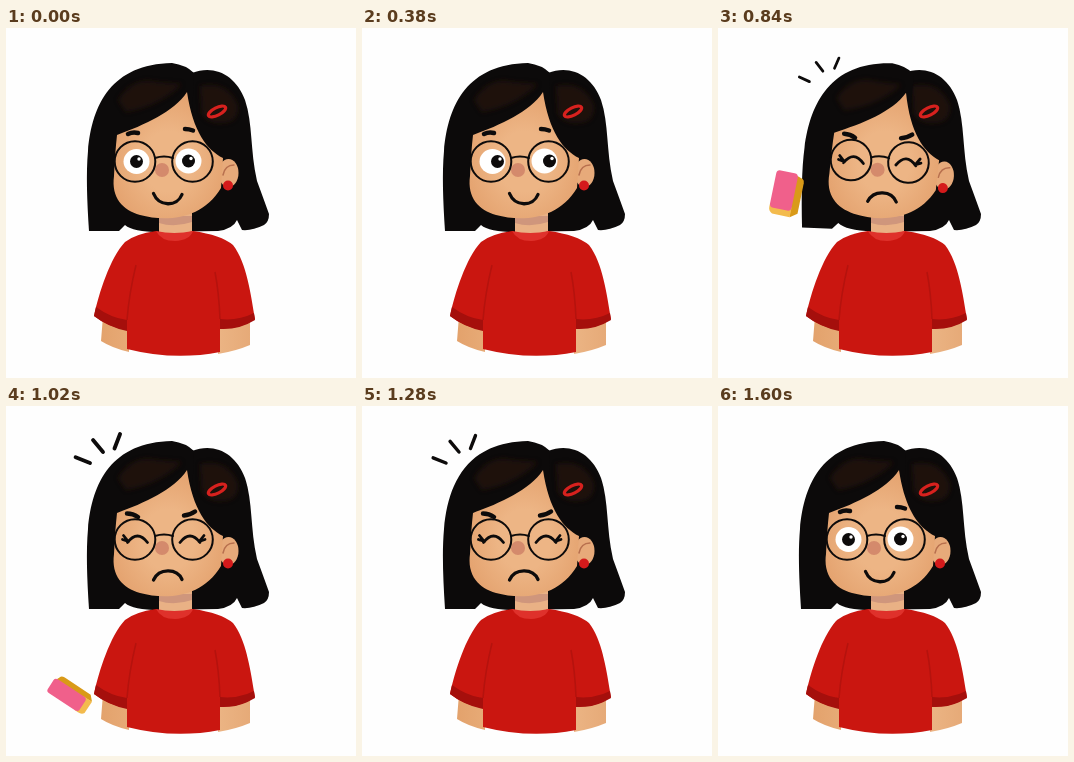
An HTML page that plays this animation: 350x350 px, repeating every 1840 ms.

```html
<!DOCTYPE html>
<html lang="en">
<head>
<meta charset="utf-8">
<title>Girl and eraser</title>
<style>
html, body { margin: 0; width: 100%; height: 100%; overflow: hidden; background: #fefefe; }
svg { display: block; width: 100vw; height: 100vh; }
.line { fill: none; stroke: #0d0b0b; stroke-linecap: round; stroke-linejoin: round; }
.hair { fill: #0c0a0a; }
.sheen { fill: #2a1610; opacity: .6; filter: url(#soft); }
</style>
</head>
<body>
<svg viewBox="0 0 350 350">
  <defs>
    <radialGradient id="skin" cx=".5" cy=".55" r=".6">
      <stop offset=".4" stop-color="#edb585"/><stop offset="1" stop-color="#e3a06c"/>
    </radialGradient>
    <linearGradient id="arm">
      <stop offset="0" stop-color="#e3a26c"/><stop offset=".6" stop-color="#f0bd8e"/><stop offset="1" stop-color="#e6aa78"/>
    </linearGradient>
    <filter id="soft" x="-30%" y="-30%" width="160%" height="160%"><feGaussianBlur stdDeviation="2.5"/></filter>
    <g id="eye">
      <ellipse rx="13" ry="12.5" fill="#fff"/>
      <g class="pupil"><circle r="6.5" fill="#0d0b0b"/><circle cx="2.5" cy="-2.5" r="1.7" fill="#fff"/></g>
    </g>
    <g id="wince" class="line" stroke-width="2.8"><path d="M-10 4Q0 -9 10 4M-10 2L-14 -3M-9 3L-15 1"/></g>
  </defs>

  <path class="hair" d="M150 60L186 45C208 36 230 47 239 72C247 96 244 122 251 153Q258 172 263 186Q263 194 258 197Q246 203 236 202L231 192Q227 201 212 203L150 204Z"/>
  <path class="sheen" d="M194 58Q222 52 232 78Q232 92 222 94Q204 98 196 86Z"/>

  <g class="head">
    <path class="hair" d="M83 203C81 172 80 145 82 123C86 76 106 36 166 35Q180 37 188 45L186 92L153 204Q127 204 119 197L113 203Z"/>
    <path class="sheen" d="M112 72Q128 48 150 54L176 56Q154 78 120 84Z"/>
  </g>

  <path fill="#e9b185" d="M153 184H186V210H153Z"/>
  <path fill="#cf967c" d="M153 188H186V194Q168 200 153 195Z"/>
  <path fill="url(#arm)" d="M97 288L123 298V324Q106 320 95 313ZM212 296L244 292V317Q230 323 212 326Z"/>
  <path fill="#ca1610" d="M150 203Q168 210 187 203Q215 207 227 217C241 235 245 268 249 291Q232 302 214 300V324Q168 333 121 321V302Q102 299 88 288C93 265 104 230 119 214Q129 206 150 203Z"/>
  <path fill="#a50f0c" d="M90 279Q105 290 121 292V303Q102 299 88 288ZM214 291Q232 293 248 285L249 292Q233 302 214 301Z"/>
  <path fill="#df312b" d="M150 203Q168 207 187 203Q184 212 169 213Q155 213 150 203Z"/>
  <path fill="none" stroke="#a9110d" stroke-width="1.5" opacity=".65" d="M130 237Q123 266 121 292M209 244Q213 265 214 291"/>

  <g class="head">
    <ellipse cx="222.5" cy="145" rx="10" ry="14" fill="#e7aa7a"/>
    <path fill="url(#skin)" d="M181 64C168 84 138 97 111 107Q109 125 108 148C105 170 117 182 134 187C160 194 196 192 215 160L217 130C201 122 187 104 181 64Z"/>
    <path fill="none" stroke="#b8704e" stroke-width="1.5" stroke-linecap="round" d="M217 147Q219 137 228 137"/>
    <circle cx="222" cy="157.5" r="5" fill="#d41a1b"/>
    <circle cx="156" cy="142" r="7" fill="#d48a6c"/>
    <g id="calm">
      <use href="#eye" x="130.5" y="133.5"/><use href="#eye" x="182.5" y="133"/>
      <path class="line" stroke-width="4.5" d="M122 106Q127 103.500 132 105M179 101Q183 101 187 102.500"/>
      <path class="line" stroke-width="3.300" d="M147.500 165.500C153 179 171 179 176 166.500"/>
    </g>
    <g id="pained">
      <use href="#wince" transform="translate(131.500 132.500)"/>
      <use href="#wince" transform="translate(184 132.500) scale(-1 1)"/>
      <path class="line" stroke-width="4.500" d="M121 107.500Q127 107.500 132 111M178 109.500Q184 109 189 105.500"/>
      <path class="line" stroke-width="3.300" d="M147.500 174C153 162 171 162 176 173.500"/>
    </g>
    <g class="line" stroke-width="2">
      <circle cx="129" cy="133.500" r="20.300"/><circle cx="186.500" cy="133.500" r="20.300"/>
      <path d="M149 130Q158 127 167 130"/>
    </g>
    <path id="sparks" class="line"/>
  </g>

  <ellipse cx="211" cy="83.500" rx="9.500" ry="3.800" fill="none" stroke="#d7211e" stroke-width="3.200" transform="rotate(-27 211 83.500)"/>

  <g id="eraser">
    <path fill="#d99a18" d="M3 -21L12 -18Q14 -17 14 -14V17L7 22Z"/>
    <path fill="#f3bb4d" d="M-15 12H7V22H-11Q-15 20 -15 16Z"/>
    <rect x="-15" y="-22" width="22" height="38" rx="4" fill="#f0608b"/>
  </g>
</svg>
<script>
const LOOP = 1840, ENTER = 420, HIT = 690, GONE = 1070, RECOVER = 1520;
const SPARKS = [[84, 57, 22], [97, 46, 50], [108.5, 42.5, 111]]; // base x, y and angle
const $ = id => document.getElementById(id);
const heads = document.querySelectorAll('.head');
const pupils = document.querySelectorAll('.pupil');

const show = (el, on) => el.setAttribute('visibility', on ? 'visible' : 'hidden');
const smooth = (t, from, to) => {
  const k = Math.min(1, Math.max(0, (t - from) / (to - from)));
  return k * k * (3 - 2 * k);
};

function drawEraser(t) {
  show($('eraser'), t > ENTER && t < GONE);
  const since = t - HIT;
  const arc = 14 * Math.sin(Math.PI * (t - ENTER) / (HIT - ENTER));
  const x = 73 + since * (since < 0 ? 0.36 : -0.025);
  const y = 64 + (since < 0 ? -arc : since * 0.677);
  const s = (t - 640) / 1000;
  const turn = 45 - 53 * s - 561 * s * s;
  const squash = 1 - 0.25 * smooth(t, 840, 1020);
  $('eraser').setAttribute('transform', `translate(${x} ${y}) rotate(${turn}) scale(${squash} 1)`);
}

function drawSparks(t) {
  const power = Math.sin(Math.PI * (t - HIT) / (RECOVER - HIT)) ** 0.6;
  const d = SPARKS.map(([x, y, angle]) => {
    const a = angle * Math.PI / 180, len = 16 * power;
    return `M${x} ${y}l${-len * Math.cos(a)} ${-len * Math.sin(a)}`;
  });
  $('sparks').setAttribute('d', d.join(''));
  $('sparks').setAttribute('stroke-width', 4 * power);
}

function draw(t) {
  const hurt = t >= HIT && t < RECOVER;
  show($('calm'), !hurt);
  show($('pained'), hurt);
  show($('sparks'), hurt);
  if (hurt) drawSparks(t);
  drawEraser(t);

  const look = 5 * smooth(t, 80, 320) * (1 - smooth(t, RECOVER, 1590));
  pupils.forEach(p => p.setAttribute('transform', `translate(${look} 0)`));

  const tilt = 2.5 * smooth(t, HIT, 790) * (1 - smooth(t, 840, 1000));
  heads.forEach(h => h.setAttribute('transform', `rotate(${tilt} 165 225)`));
}

const start = performance.now();
function tick() {
  draw((performance.now() - start) % LOOP);
  requestAnimationFrame(tick);
}
tick();
</script>
</body>
</html>
```
